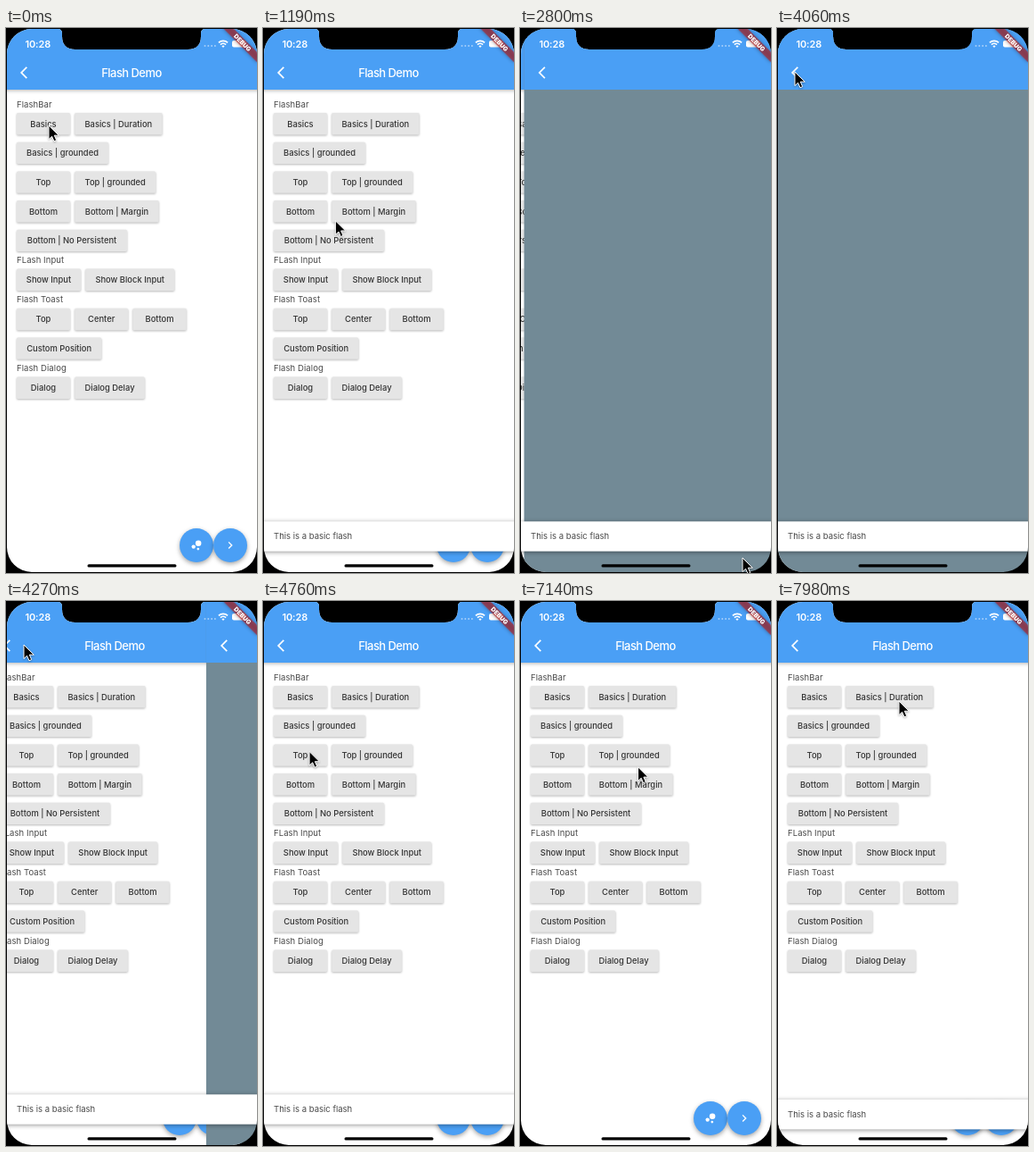
Animation, 282 px wide and 610 px high, one loop 8 s. Source, as an HTML page:

```html
<!DOCTYPE html>
<html lang="en">
<head>
<meta charset="utf-8">
<title>Flash Demo</title>
<style>
  html, body { margin: 0; width: 100%; height: 100%; overflow: hidden; background: #000; }
  svg { display: block; width: 282px; height: 610px; }
  text { font-family: Inter, "Open Sans", sans-serif; dominant-baseline: auto; }
  .label { font-size: 9.5px; fill: #474747; letter-spacing: .08px; }
  .btn rect { fill: #e5e5e5; filter: drop-shadow(0 1px .8px rgba(0, 0, 0, .28)); }
  .btn text { font-size: 9.4px; font-weight: 500; fill: #333; text-anchor: middle; }
  .title { font-size: 13px; font-weight: 500; fill: #fff; text-anchor: middle; letter-spacing: -.55px; }
  .blue { fill: #4a9ff5; }
  .white { fill: #fff; }
  .bar { filter: drop-shadow(0 1.5px 2px rgba(0, 0, 0, .3)); }
  .fab { filter: drop-shadow(0 2px 2.5px rgba(0, 0, 0, .35)); }
  .sheet { filter: drop-shadow(0 1px 2.5px rgba(0, 0, 0, .42)); }
</style>
</head>
<body>
<svg viewBox="0 0 282 610">
  <defs>
    <clipPath id="screen">
      <path d="M29 1H58Q63 1 63 6V9Q63 24 78 24H204Q219 24 219 9V6Q219 1 224 1H254A28 28 0 0 1 282 29V581A28 28 0 0 1 254 609H29A28 28 0 0 1 1 581V29A28 28 0 0 1 29 1Z"/>
    </clipPath>
    <path id="back" class="white" transform="translate(16 41.8) scale(.68)"
      d="M11.67 3.87L9.9 2.1 0 12l9.9 9.9 1.77-1.77L3.54 12z"/>
  </defs>
  <rect width="282" height="610"/>
  <g clip-path="url(#screen)">
    <g id="home">
      <rect class="white" width="282" height="610"/>
      <g id="content"></g>
      <rect class="blue bar" x="-4" width="290" height="69"/>
      <use href="#back"/>
      <text class="title" x="141" y="54.6">Flash Demo</text>
      <circle class="blue fab" cx="214" cy="579" r="19"/>
      <g class="white" transform="translate(205.8 570.8) scale(.68)">
        <circle cx="7.2" cy="14.4" r="3.2"/>
        <circle cx="14.8" cy="18" r="2"/>
        <circle cx="15.2" cy="8.8" r="4.8"/>
      </g>
      <circle class="blue fab" cx="252" cy="579" r="19"/>
      <circle id="ripple" class="white" cx="252" cy="579" r="19"/>
      <path class="white" transform="translate(243.8 570.8) scale(.68)"
        d="M10 6L8.59 7.41 13.17 12l-4.58 4.59L10 18l6-6z"/>
    </g>
    <g id="next">
      <rect width="282" height="610" fill="#728a96"/>
      <rect class="blue" width="282" height="69"/>
      <use href="#back"/>
    </g>
    <g id="flash">
      <rect class="white sheet" x="-4" y="552.3" width="290" height="33.4"/>
      <text class="label" x="12" y="572.4" style="letter-spacing:0">This is a basic flash</text>
    </g>
    <g class="white">
      <text x="21.5" y="22" font-size="11" font-weight="600" letter-spacing="-.15">10:28</text>
      <g id="dots" opacity=".5"></g>
      <g fill="none" stroke="#fff" stroke-width="1.7">
        <path d="M238.9 16.4a7.2 7.2 0 0 1 10.2 0"/>
        <path d="M240.9 18.6a4.4 4.4 0 0 1 6.2 0"/>
      </g>
      <path d="M242.4 20.2a2.3 2.3 0 0 1 3.2 0L244 21.9z"/>
      <rect x="254" y="14" width="15.5" height="7.4" rx="2"/>
    </g>
    <g transform="translate(282 0) rotate(45)">
      <rect x="-27.2" y="19" width="54.4" height="8.2" fill="#b71c1c" fill-opacity=".63"
        style="filter:drop-shadow(0 0 2px rgba(0,0,0,.5))"/>
      <text y="25.6" class="white" font-size="6.9" font-weight="900" text-anchor="middle">DEBUG</text>
    </g>
    <rect x="91.5" y="600.2" width="100" height="3.4" rx="1.7"/>
  </g>
  <path id="cursor" d="M0 0V15.6L3.6 12.3 6 17.8 8.7 16.6 6.3 11.2H11.3Z" stroke="#fff" stroke-width="1"
    stroke-linejoin="round" style="filter:drop-shadow(0 1px 1px rgba(0,0,0,.3))"/>
</svg>
<script>
const LOOP = 8000, FLASH_DROP = 60;
const $ = id => document.getElementById(id);

function add(parent, tag, attrs, text) {
  const el = document.createElementNS('http://www.w3.org/2000/svg', tag);
  for (const k in attrs) el.setAttribute(k, attrs[k]);
  if (text) el.textContent = text;
  parent.appendChild(el);
  return el;
}

const label = (y, text) => add($('content'), 'text', { class: 'label', x: 12, y: y + 3.4 }, text);

// Lays out a row of [text, width] buttons around the centre line y.
function row(y, ...buttons) {
  let x = 12;
  for (const [text, w] of buttons) {
    const g = add($('content'), 'g', { class: 'btn' });
    add(g, 'rect', { x, y: y - 12.2, width: w, height: 24.4, rx: 1.5 });
    add(g, 'text', { x: x + w / 2, y: y + 3.3 }, text);
    x += w + 5.2;
  }
}

label(85.2, 'FlashBar');
row(107.3, ['Basics', 60], ['Basics | Duration', 98.3]);
row(139.9, ['Basics | grounded', 103]);
row(172.6, ['Top', 60], ['Top | grounded', 91]);
row(205.2, ['Bottom', 60], ['Bottom | Margin', 94.5]);
row(237.9, ['Bottom | No Persistent', 124]);
label(259.6, 'FLash Input');
row(281.8, ['Show Input', 72], ['Show Block Input', 100]);
label(303.7, 'Flash Toast');
row(326, ['Top', 60], ['Center', 60], ['Bottom', 60.3]);
row(358.6, ['Custom Position', 95.3]);
label(380.5, 'Flash Dialog');
row(402.8, ['Dialog', 60], ['Dialog Delay', 78.7]);

for (let i = 0; i < 4; i++) add($('dots'), 'circle', { cx: 223.5 + i * 3.8, cy: 20, r: 1 });

const clamp = v => Math.min(1, Math.max(0, v));
const span = (t, start, length) => clamp((t - start) / length);

function bezier(x1, y1, x2, y2) {
  const at = (a, b, s) => 3 * a * s * (1 - s) ** 2 + 3 * b * s * s * (1 - s) + s ** 3;
  return x => {
    let lo = 0, hi = 1;
    for (let i = 0; i < 24; i++) {
      const mid = (lo + hi) / 2;
      if (at(x1, x2, mid) < x) lo = mid; else hi = mid;
    }
    return at(y1, y2, (lo + hi) / 2);
  };
}
const slideIn = bezier(.4, 0, .2, 1);
const pageEase = bezier(.35, .91, .33, .97);

// Pointer stops: [time, x, y]
const stops = [
  [0, 48, 109], [960, 48, 109], [1190, 81, 215], [1680, 258, 588], [1900, 250, 593],
  [3330, 250, 593], [3980, 20, 49], [4450, 20, 49], [4760, 52, 168], [5550, 108, 570],
  [5830, 108, 570], [6020, 108, 600], [6250, 108, 600], [7300, 137, 112], [LOOP, 137, 112]
];

function pointer(t) {
  const i = Math.max(1, stops.findIndex(s => s[0] >= t));
  const a = stops[i - 1], b = stops[i];
  const k = span(t, a[0], b[0] - a[0]);
  return [a[1] + (b[1] - a[1]) * k, a[2] + (b[2] - a[2]) * k];
}

function flashOffset(t) {
  if (t < 5830) return FLASH_DROP * (1 - slideIn(span(t, 250, 500)));
  if (t < 7000) return 45 * span(t, 5830, 190) + 20 * span(t, 6020, 70);
  return FLASH_DROP * (1 - slideIn(span(t, 7660, 500)));
}

const move = (id, x, y) => $(id).setAttribute('transform', `translate(${x} ${y})`);

function render(t) {
  const page = pageEase(span(t, 2497, 400)) - pageEase(span(t, 4130, 400));
  move('home', -94 * page, 0);
  move('next', 282 * (1 - page), 0);
  const drop = flashOffset(t);
  move('flash', 0, drop);
  $('flash').style.display = drop >= FLASH_DROP ? 'none' : '';
  $('ripple').style.opacity = .3 * (span(t, 2400, 90) - span(t, 2560, 200));
  move('cursor', ...pointer(t));
}

function tick() {
  render(performance.now() % LOOP);
  requestAnimationFrame(tick);
}
tick();
</script>
</body>
</html>
```
